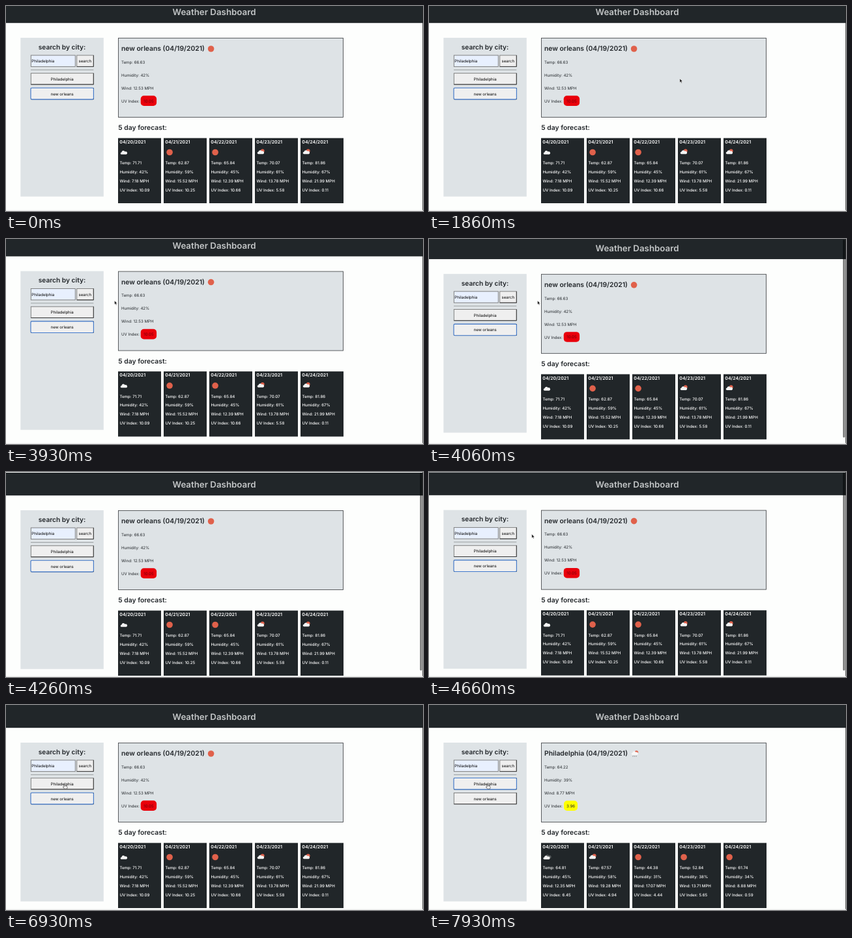
An HTML page for the animation above (8 s loop, 640x316 px).

```html
<!DOCTYPE html>
<html lang="en">
<head>
<meta charset="utf-8">
<title>Weather Dashboard</title>
<style>
  html, body { margin: 0; width: 100%; height: 100%; overflow: hidden; background: #fdfefd; }
  svg { display: block; width: 100%; height: 100%; }
  text { font: 400 6.15px Inter, "Liberation Sans", sans-serif; fill: #212529; text-rendering: geometricPrecision; }
  .head { font-size: 10.35px; font-weight: 600; }
  .title { font-size: 13.3px; font-weight: 600; fill: #c3c6c7; }
  .date { font-size: 7px; font-weight: 600; fill: #fff; }
  .card { font-weight: 500; fill: #fff; }
  .mid { text-anchor: middle; }
  .btn { font-size: 6.1px; fill: #000; }
</style>
</head>
<body>
<svg id="stage" viewBox="0 0 640 316"></svg>
<script>
const LOOP = 8000, FOCUS_AT = 7260, DATA_AT = 7460;
const PANEL = '#dee3e6', DARK = '#212629', SUN = '#e0614b';

// Rows hold temperature, humidity, wind and UV index.
const cities = [
  { name: 'new orleans', icon: 'sun', iconX: 314.6, now: [66.63, 42, 12.53, '10.05'],
    badge: [206.7, 147.3, 24.4, 15.6, '#e9000b', '#74000a'],
    days: [['cloud', 71.71, 42, 7.18, 10.09], ['sun', 62.87, 59, 15.52, 10.25],
      ['sun', 65.84, 45, 12.39, 10.66], ['few', '70.07', 61, 13.78, 5.58], ['few', 81.86, 67, 21.99, 0.11]] },
  { name: 'Philadelphia', icon: 'rain', iconX: 316, now: [64.22, 39, 8.77, '3.96'],
    badge: [207, 147.6, 21, 15.4, '#ffff00', '#212529'],
    days: [['clouds', 64.81, 45, 12.35, 6.45], ['few', 67.57, 58, 19.28, 4.94],
      ['sun', 44.38, 31, 17.07, 4.44], ['sun', 52.84, 38, 13.71, 5.65], ['sun', 61.74, 34, 8.88, 0.59]] }
];

const text = (x, y, s, cls = '', extra = '') => `<text x="${x}" y="${y}" class="${cls}" ${extra}>${s}</text>`;
const rect = (x, y, w, h, fill, extra = '') =>
  `<rect x="${x}" y="${y}" width="${w}" height="${h}" fill="${fill}" ${extra}/>`;
const disc = (x, y, r, fill = SUN) => `<circle cx="${x}" cy="${y}" r="${r}" fill="${fill}"/>`;
const cloud = (fill, x = 0, y = 0) => `<path transform="translate(${x} ${y}) scale(1.05)" fill="${fill}"
  d="M-3.5 2.5a1.6 1.6 0 0 1 0-3.2a2.6 2.6 0 0 1 4.9-.9a2.1 2.1 0 0 1 2 4.1z"/>`;

const icons = {
  sun: disc(0, 0, 4.8),
  cloud: cloud('#f4f4f4', 0, .7),
  few: disc(2.6, -2.2, 2.9) + cloud('#f4f4f4'),
  clouds: cloud('#55595b', 1.6, -.8) + cloud('#f4f4f4', -.4, .9),
  rain: disc(2.4, -2, 2.8) + cloud('#f7f7f7', 0, -.6) +
    '<path d="M-2.5 3l-.8 2M0 3l-.8 2M2.5 3l-.8 2" stroke="#777" stroke-width=".7"/>'
};
const icon = (kind, x, y) => `<g transform="translate(${x} ${y})">${icons[kind]}</g>`;
const lines = ([temp, hum, wind, uv]) =>
  [`Temp: ${temp}`, `Humidity: ${hum}%`, `Wind: ${wind} MPH`, `UV Index: ${uv}`];

function report({ name, icon: kind, iconX, now, badge, days }) {
  const [bx, by, bw, bh, fill, ink] = badge;
  const rows = lines([...now.slice(0, 3), '']);
  return text(177, 78.4, `${name} (04/19/2021)`, 'head') +
    icon(kind, iconX, 75) +
    rows.map((s, i) => text(177, 97.7 + 20 * i, s)).join('') +
    rect(bx, by, bw, bh, fill, 'rx="5"') +
    text(bx + bw / 2, 157.6, now[3], 'mid', `style="fill:${ink}"`) +
    days.map(([kind, ...vals], i) => {
      const x = 172.3 + 70 * i;
      return icon(kind, x + 8.8, 234.5) +
        lines(vals).map((s, k) => text(x + 2.1, 253 + 13.9 * k, s, 'card')).join('');
    }).join('');
}

const bevel = (x, y, w, h, fill) => rect(x, y, w, h, fill, 'stroke="#777" stroke-width=".9"') +
  `<path d="M${x} ${y + h}h${w}v${-h}" fill="none" stroke="#3a3a3a"/>`;
// A focused button swaps its bevel for a blue outline.
const cityButton = (id, y, label) => bevel(38.3, y, 96, 17.2, '#efefef') +
  rect(38, y - .2, 96.4, 17.6, '#efefef', `id="${id}" rx="1.8" stroke="#3f78cc" stroke-width="1.1"`) +
  text(86.2, y + 11, label, 'btn mid');

const page = rect(0, 0, 640, 35.2, DARK) +
  text(319.5, 23, 'Weather Dashboard', 'title mid') +
  rect(22.3, 58, 127.5, 244.7, PANEL) +
  text(86, 75.7, 'search by city:', 'head mid', 'style="font-size:10.2px"') +
  rect(38.3, 85, 68, 17.4, '#e8f0fe', 'stroke="#767676" stroke-width=".9"') +
  text(39.3, 96, 'Philadelphia', 'btn') +
  bevel(108.7, 85, 25.6, 17.4, '#efefef') + text(121.3, 96, 'search', 'btn mid') +
  rect(38, 107, 96.3, .8, '#8b9092') +
  cityButton('ring1', 112.7, 'Philadelphia') + cityButton('ring0', 135.5, 'new orleans') +
  rect(172.5, 58.5, 345, 122, PANEL, 'stroke="#4a4d50" stroke-width=".9"') +
  text(172.3, 200.2, '5 day forecast:', 'head') +
  cities[0].days.map((_, i) => rect(172 + 70 * i, 212.6, 66, 100.4, DARK) +
    text(174.3 + 70 * i, 220.8, `04/${20 + i}/2021`, 'date')).join('') +
  cities.map((c, i) => `<g id="city${i}">${report(c)}</g>`).join('');

const arrow = `<path id="arrow" d="M0 0v6l1.4-1.2l1 2.2l1-.5l-1-2.1h1.9z"
  fill="#111" stroke="#fff" stroke-width=".5"/>`;
const hand = `<path id="hand" d="M-.8-2.6q.8-1 1.5 0v2.3l2.6.6q.9.3.8 1.2l-.5 2.7h-4l-2.2-2.8q.2-1 1.8 0z"
  fill="#fff" stroke="#222" stroke-width=".6" stroke-linejoin="round"/>`;

const $ = id => document.getElementById(id);
$('stage').innerHTML = rect(0, 0, 640, 316, '#fdfefd') + `<g id="page">${page}</g>` +
  rect(635.4, 1, 3, 305, '#000', 'id="thumb" rx="1.5"') +
  rect(639.3, 0, .7, 316, '#222') + rect(0, 314.6, 640, 1.4, '#ececec') +
  `<g id="cursor">${arrow}${hand}</g>`;

// Linear interpolation through [time, ...values] keys.
function track(keys, t) {
  const n = keys.findIndex(k => k[0] > t);
  if (n < 1) return keys[n ? keys.length - 1 : 0].slice(1);
  const a = keys[n - 1], b = keys[n], f = (t - a[0]) / (b[0] - a[0]);
  return a.slice(1).map((v, i) => v + (b[i + 1] - v) * f);
}

const scroll = [[3860, -9], [3930, -8.5], [4060, -4.2], [4160, -.6], [4260, 1], [4530, 1], [4860, 0]];
const thumb = [[3930, 0], [4060, .53], [4730, .53], [5060, 0]];
const path = [[330, 470, 160], [530, 386, 112], [1860, 386, 112], [2060, 166.5, 95],
  [4530, 166.5, 95], [5060, 131, 98], [5330, 129.5, 98.5], [5460, 124, 97], [5600, 124, 97], [5660, 122, 98],
  [5930, 122, 98], [6260, 114, 110], [6400, 114, 110], [6730, 90, 125]];

const show = (id, on) => $(id).setAttribute('visibility', on ? 'visible' : 'hidden');

function draw(t) {
  const [y] = track(scroll, t), [x, cy] = track(path, t);
  const loaded = t >= DATA_AT, focused = t >= FOCUS_AT;
  $('page').setAttribute('transform', `translate(0 ${y})`);
  $('thumb').setAttribute('opacity', track(thumb, t)[0]);
  show('city0', !loaded);
  show('city1', loaded);
  show('ring0', !focused);
  show('ring1', focused);
  const visible = t >= 330 && (t < 4130 || t >= 4530);
  const pointing = x < 134 && (cy > 112 || (x > 108 && cy < 103));
  $('cursor').setAttribute('transform', `translate(${x} ${cy})`);
  show('arrow', visible && !pointing);
  show('hand', visible && pointing);
}

function tick() {
  draw(performance.now() % LOOP);
  requestAnimationFrame(tick);
}
tick();
</script>
</body>
</html>
```
